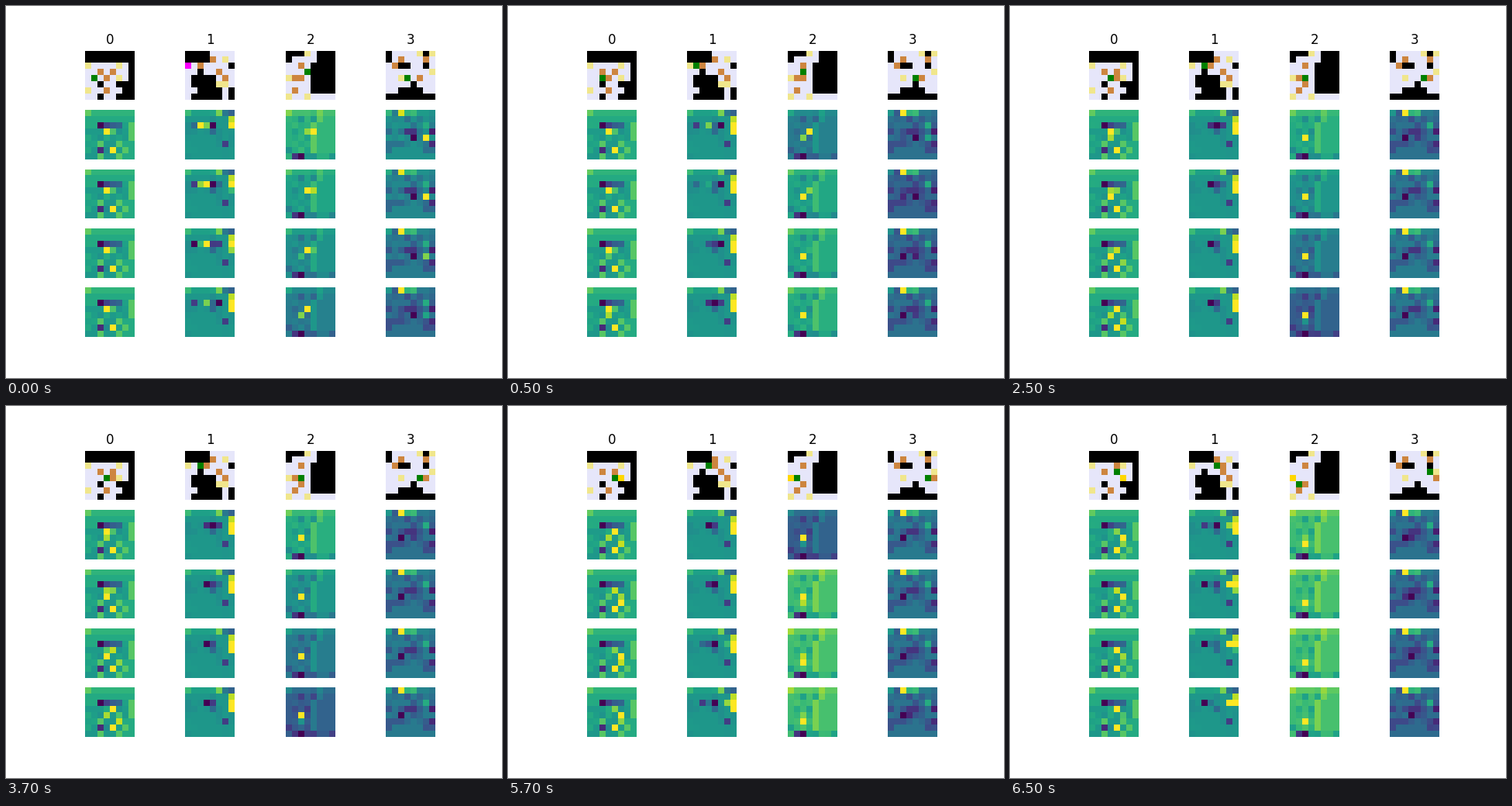
These frames come from a looping animation (640x480 px, 8 s). A matplotlib script:

```python
import numpy as np
import matplotlib.pyplot as plt
from matplotlib.animation import FuncAnimation
from matplotlib.colors import to_rgb

SIZE, TICKS, FADE = 8, 4, 3
LAST = 5 * (TICKS - 1)
MOVES = {"U": (-1, 0), "D": (1, 0), "L": (0, -1), "R": (0, 1)}
FLOOR, WALL, TARGET, BOX, DONE, AGENT, AGENT_ON_TARGET = map(
    to_rgb, ("lavender", "black", "khaki", "peru", "gold", "green", "magenta"))

# Walls are (row, column, height, width) blocks.
LEVELS = [
    dict(walls=[(0, 0, 2, 8), (2, 7, 6, 1), (5, 5, 1, 2), (6, 6, 2, 1),
                (7, 5, 1, 1), (5, 2, 1, 1), (7, 2, 1, 1)],
         targets={(2, 0), (2, 5), (4, 5), (6, 0)},
         boxes={(3, 2), (3, 4), (4, 3), (6, 3)},
         agent=(4, 1), moves="RRRU"),
    dict(walls=[(0, 0, 2, 4), (2, 7, 1, 1), (3, 2, 1, 1), (4, 1, 2, 4),
                (6, 2, 1, 4), (7, 1, 1, 5), (6, 7, 2, 1)],
         targets={(1, 6), (2, 0), (5, 5), (5, 6)},
         boxes={(1, 4), (2, 2), (3, 5), (4, 6)},
         agent=(2, 0), moves="RRRR"),
    dict(walls=[(0, 0, 1, 3), (1, 0, 1, 1), (0, 5, 2, 3), (2, 4, 5, 4)],
         targets={(0, 3), (4, 0), (7, 0), (7, 3)},
         boxes={(2, 2), (4, 1), (4, 2), (6, 1)},
         agent=(3, 3), moves="LDLD"),
    dict(walls=[(0, 0, 2, 1), (0, 6, 1, 1), (2, 2, 1, 2), (2, 6, 1, 1),
                (5, 4, 1, 1), (6, 2, 1, 4), (7, 0, 1, 8)],
         targets={(0, 5), (0, 7), (3, 7), (4, 2)},
         boxes={(1, 2), (1, 6), (2, 1), (4, 5)},
         agent=(4, 3), moves="RRRU"),
]

# Activations in percent: a background level over time, random grain on the
# floor, a ridge where floor meets wall, steady cells, and a hot and a cold
# spot that each travel from cell to cell at the given ticks.
HEAT = [
    dict(level=[(0, 61)], grain=(-13, 1), ridge=13,
         steady={(2, 2): 0, (2, 3): 20, (2, 4): 30, (2, 5): 33,
                 (3, 4): 72, (6, 2): 12, (6, 4): 100},
         hot=[(0, (3, 3)), (7, (4, 3)), (9, (3, 4)), (10, (5, 5)),
              (11, (4, 5)), (14, (3, 4))],
         cold=[]),
    dict(level=[(0, 53)], grain=(-4, 2), ridge=0,
         steady={(0, 5): 80, (0, 6): 40, (0, 7): 32, (1, 7): 90,
                 (2, 7): 100, (2, 3): 40, (3, 4): 35, (5, 6): 18},
         hot=[(0, (2, 2)), (1, (2, 3)), (3, (3, 7)), (13, (2, 6))],
         cold=[(0, (2, 4)), (2, (2, 1)), (3, (2, 5)), (6, (2, 4)),
               (7, (2, 3)), (10, (2, 4)), (13, (2, 2))]),
    dict(level=[(0, 66), (3, 44), (4, 60), (6, 63), (9, 32), (10, 71)],
         grain=(-15, 1), ridge=9,
         steady={(7, 1): 15, (7, 2): 0},
         hot=[(0, (3, 4)), (1, (3, 3)), (4, (4, 2)), (11, (5, 2))],
         cold=[]),
    dict(level=[(0, 51), (2, 42), (4, 33), (8, 42), (15, 35)],
         grain=(-18, 2), ridge=0,
         steady={(0, 2): 92, (0, 3): 65, (0, 4): 68, (2, 6): 62,
                 (3, 3): 15, (3, 4): 15, (3, 7): 8, (5, 7): 12},
         hot=[(0, (4, 6)), (2, (0, 2))],
         cold=[(0, (4, 4)), (5, (4, 2)), (13, (4, 3))]),
]


def wall_mask(level):
    mask = np.zeros((SIZE, SIZE), dtype=bool)
    for r, c, h, w in level["walls"]:
        mask[r:r + h, c:c + w] = True
    return mask


def play(level, steps):
    """Return agent and boxes after the given number of moves."""
    agent, boxes = level["agent"], set(level["boxes"])
    for move in level["moves"][:steps]:
        dr, dc = MOVES[move]
        agent = agent[0] + dr, agent[1] + dc
        if agent in boxes:
            boxes.remove(agent)
            boxes.add((agent[0] + dr, agent[1] + dc))
    return agent, boxes


def draw_level(level, steps):
    grid = np.full((SIZE, SIZE, 3), FLOOR)
    grid[wall_mask(level)] = WALL
    agent, boxes = play(level, steps)
    targets = level["targets"]
    for cell in targets:
        grid[cell] = TARGET
    for cell in boxes:
        grid[cell] = DONE if cell in targets else BOX
    grid[agent] = AGENT_ON_TARGET if agent in targets else AGENT
    return grid


def make_relief(level, heat, rng):
    """Fixed offsets from the background level."""
    walls = wall_mask(level)
    relief = np.where(walls, 0, rng.uniform(*heat["grain"], walls.shape))
    relief[:, 1:][walls[:, 1:] & ~walls[:, :-1]] += heat["ridge"]
    relief[0] += 4
    relief[0, 0] += 11
    return relief


def pull(grid, path, peak, tick):
    """Draw the path's cells to the peak, fading before and after their stay."""
    ends = [start - 1 for start, _ in path[1:]] + [LAST]
    for (start, cell), end in zip(path, ends):
        gap = max(start - tick, tick - end, 0)
        grid[cell] += (peak - grid[cell]) * max(1 - gap / FADE, 0)


def draw_heat(heat, relief, tick):
    grid = np.interp(tick, *zip(*heat["level"])) + relief
    for cell, value in heat["steady"].items():
        grid[cell] = value
    pull(grid, heat["hot"], 100, tick)
    pull(grid, heat["cold"], 0, tick)
    return grid


rng = np.random.default_rng(4)
reliefs = [make_relief(level, heat, rng) for level, heat in zip(LEVELS, HEAT)]

fig, axes = plt.subplots(1 + TICKS, len(LEVELS), figsize=(6.4, 4.8), dpi=100)
images = np.empty(axes.shape, dtype=object)
for (row, col), ax in np.ndenumerate(axes):
    ax.axis("off")
    images[row, col] = ax.imshow(np.zeros((SIZE, SIZE)), cmap="viridis",
                                 vmin=0, vmax=100, interpolation="nearest")
    if row == 0:
        ax.set_title(str(col))


def update(frame):
    step = (frame + 3) // 4
    for col, (level, heat, relief) in enumerate(zip(LEVELS, HEAT, reliefs)):
        images[0, col].set_data(draw_level(level, step))
        for tick in range(TICKS):
            # Each step starts from the last tick of the one before.
            now = step * (TICKS - 1) + tick
            images[tick + 1, col].set_data(draw_heat(heat, relief, now))
    return list(images.flat)


anim = FuncAnimation(fig, update, frames=16, interval=500, repeat=True)
plt.show()
```
